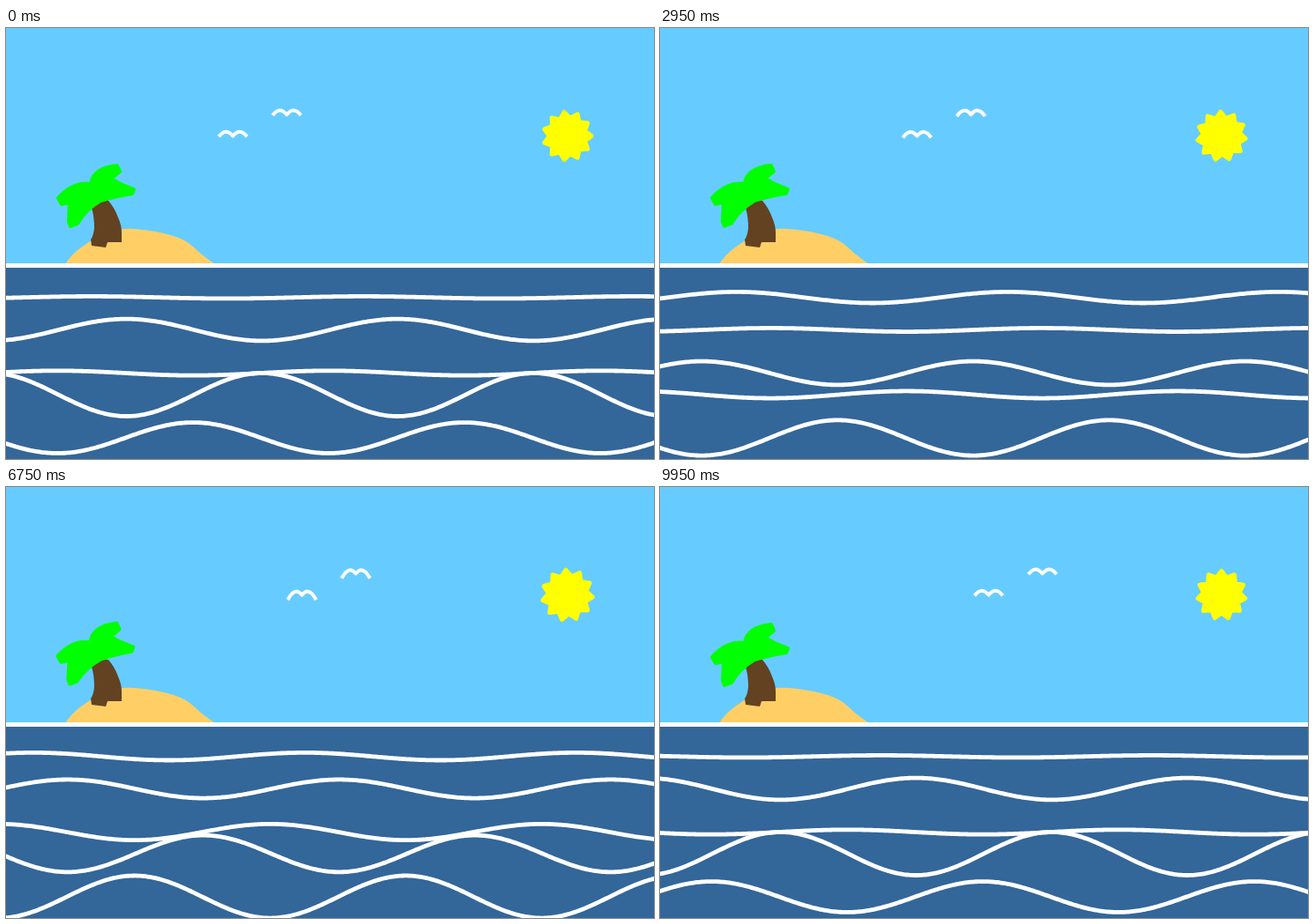
Recreate the animation shown at these times as an HTML page with a canvas. Size 734 by 489 pixels, loop 10000 ms.

```html
<!DOCTYPE html>
<html lang="en">
<head>
<meta charset="utf-8">
<title>Island</title>
<style>
  html, body { margin: 0; width: 100%; height: 100%; overflow: hidden; background: #6cf; }
  canvas { display: block; }
</style>
</head>
<body>
<canvas id="stage" width="734" height="489"></canvas>
<script>
const W = 734, H = 489, STEP = 50, STEPS = 200;
const g = document.getElementById('stage').getContext('2d');
const { sin, cos, PI } = Math;

// base line, amplitude, amplitude phase, crest position
const waves = [
  [305.7, -6.3, 1.37, 251],
  [342.5, -12.4, 0, 290],
  [391.5, -13.4, 1.37, 212],
  [416, 24.5, 0, 290],
  [465, 24.7, PI / 4, 212]
];

const sand = new Path2D('M67 268Q74 257 85 249T113 232Q127 227 146 228Q171 230 190 236Q205 241 213 249Q222 258 237 268Z');
const trunk = new Path2D('M97 204L104 196H116Q123 204 127 215Q131 224 131 232V243H115L113 249L97 247L96 240Q99 236 100 227Q100 214 97 204Z');

function stroke(color, width) {
  g.strokeStyle = color;
  g.lineWidth = width;
  g.stroke();
}

function drawWave([base, amp, phase, crest], a) {
  const h = amp * cos(1.5 * a - phase);
  g.beginPath();
  for (let x = -4; x <= W + 4; x += 2) {
    g.lineTo(x, base - h * cos(15 * (x - crest) / W - 2 * a));
  }
  stroke('#fff', 4.8);
}

function drawBird(x, y, a) {
  const tip = y + 1.3 - 4.8 * sin(2 * a);
  g.beginPath();
  g.moveTo(x - 16, tip);
  g.quadraticCurveTo(x - 8, y - 9.5, x, y + 0.5);
  g.quadraticCurveTo(x + 8, y - 9.5, x + 16, tip);
  stroke('#fff', 4);
}

function drawSun(a) {
  const scale = 1 + 0.081 * sin(a);
  g.beginPath();
  for (let i = 0; i < 22; i++) {
    const r = scale * (i % 2 ? 20.5 : 27.2);
    const angle = i * PI / 11 - a / 20;
    g.lineTo(636 + r * cos(angle), 122.5 + r * sin(angle));
  }
  g.closePath();
  g.fillStyle = '#ff0';
  g.fill();
  stroke('#ff0', 4.8);
}

function drawLeaves(a) {
  const dx = -sin(a), dy = 2.3 * dx;
  // each point gives its share of the sway as a third value
  const at = (x, y, k) => [x + dx * k, y + dy * k];
  const curve = (c, p) => g.quadraticCurveTo(...at(...c), ...at(...p));
  const line = (...p) => g.lineTo(...at(...p));
  g.beginPath();
  g.moveTo(...at(59, 193, 0.8));
  curve([76, 174, 0.8], [96, 177, 0.6]);
  curve([98, 159, 0.8], [126, 156, 1]);
  line(129, 163, 1);
  line(119, 171, 0.8);
  line(130, 177, 0.9);
  line(145, 183, 1);
  line(143, 188, 1);
  curve([128, 190, 0.8], [107, 196, 0.2]);
  curve([90, 206, 0.4], [81, 222, 1]);
  line(73, 225, 1);
  line(71, 220, 1);
  line(72, 198, 0.8);
  line(63, 200, 0.8);
  g.closePath();
  g.fillStyle = '#0f0';
  g.fill();
  stroke('#0f0', 4);
}

function draw(now) {
  const step = Math.floor(now / STEP) % STEPS;
  const a = step * 10 * PI / (STEPS - 1);

  g.fillStyle = '#6cf';
  g.fillRect(0, 0, W, H);
  drawSun(a);

  const x = 257 + a * W / 200;
  drawBird(x, 122, a);
  drawBird(x + 61, 97.7, a);

  g.fillStyle = '#ffcf66';
  g.fill(sand);
  g.fillStyle = '#634221';
  g.fill(trunk);
  drawLeaves(a);

  g.fillStyle = '#369';
  g.fillRect(0, 269, W, H - 269);
  g.fillStyle = '#fff';
  g.fillRect(0, 267, W, 5);
  for (const wave of waves) drawWave(wave, a);

  requestAnimationFrame(frame);
}

g.lineJoin = 'round';
const start = performance.now();
const frame = () => draw(performance.now() - start);
frame();
</script>
</body>
</html>
```
